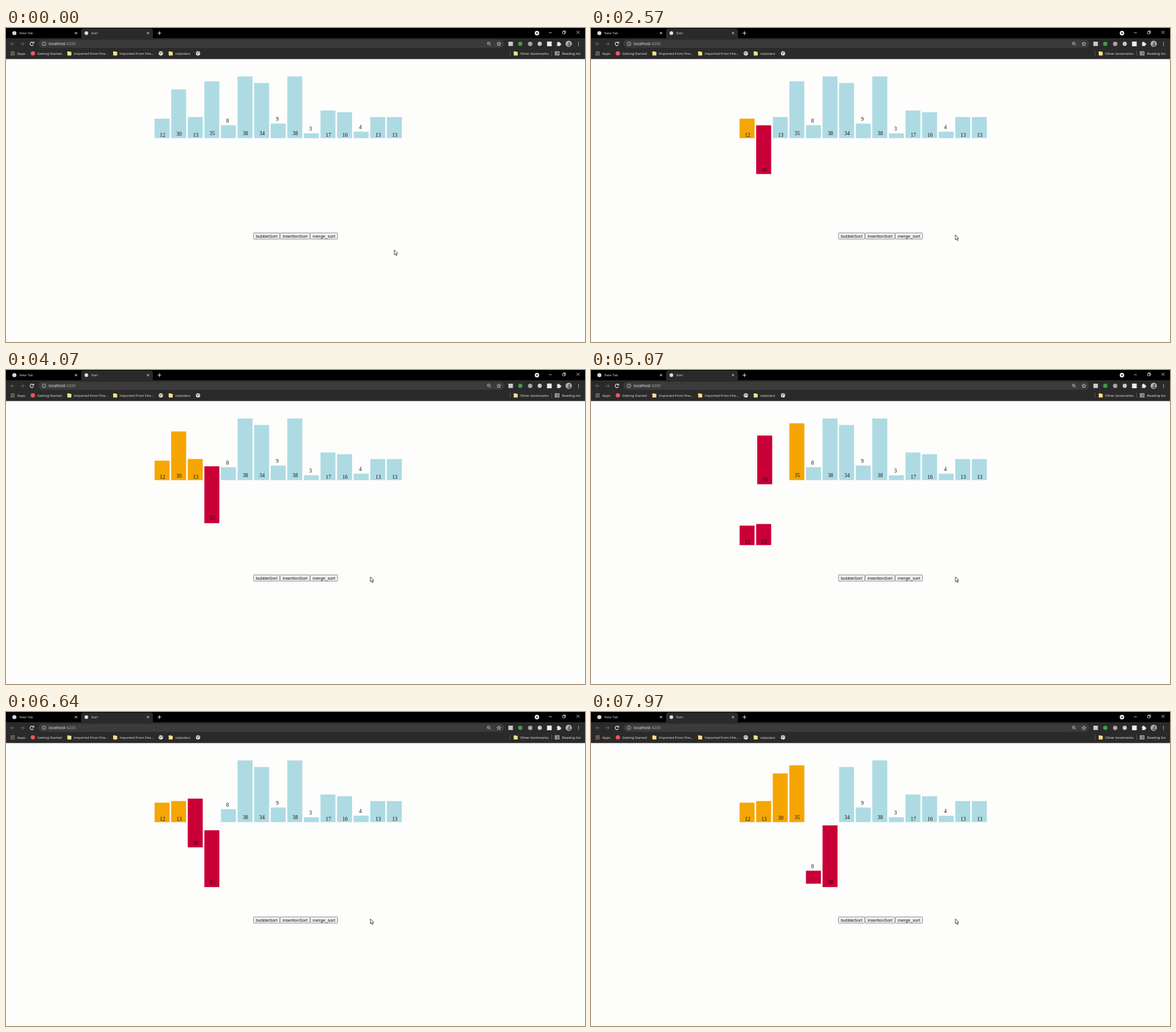
Write an HTML page with a canvas that moves like this. It is 1017 px wide and 551 px high and loops after 8 s.

```html
<!DOCTYPE html>
<html lang="en">
<head>
<meta charset="utf-8">
<title>Sort</title>
<style>
html, body { margin: 0; width: 100%; height: 100%; overflow: hidden; background: #fdfdfc; }
canvas { display: block; width: 1017px; height: 551px; }
</style>
</head>
<body>
<canvas id="stage"></canvas>
<script>
const W = 1017, H = 551, LOOP = 8000;
const canvas = document.getElementById('stage');
const ctx = canvas.getContext('2d');
const dpr = window.devicePixelRatio || 1;
canvas.width = W * dpr;
canvas.height = H * dpr;

const UI = '"Open Sans", "Noto Sans", sans-serif';
const ARIAL = '"Liberation Sans", Arial, sans-serif';
const SERIF = '"Liberation Serif", "Times New Roman", serif';
const BLUE = '#aedbe3', RED = '#c90037', ORANGE = '#f5a603';

const VALUES = [12, 30, 13, 35, 8, 38, 34, 9, 38, 3, 17, 16, 4, 13, 13];
const LEFT = 261, BASE = 193.3, PITCH = 29.14, BAR = 26.3, UNIT = 2.85, DROP = 114;

// Time in ms against the number of moves done.
const PACE = [[1400, 0], [1630, .61], [2570, 3.265], [4070, 7.216], [5070, 10.075], [6640, 14.352], [7970, 18.066], [8330, 19.05]];
const MOUSE_X = [[350, 682], [1000, 566], [1340, 566], [1630, 610.5], [1850, 640]];
const MOUSE_Y = [[350, 389.5], [1000, 364], [1340, 364], [1630, 359], [1850, 363]];

function along(keys, t) {
  if (t <= keys[0][0]) return keys[0][1];
  for (let i = 1; i < keys.length; i++) {
    const [t0, v0] = keys[i - 1], [t1, v1] = keys[i];
    if (t < t1) return v0 + (v1 - v0) * (t - t0) / (t1 - t0);
  }
  return keys[keys.length - 1][1];
}

// cubic-bezier(.25, .1, .25, 1)
function ease(u) {
  let lo = 0, hi = 1, s = .5;
  for (let i = 0; i < 24; i++) {
    s = (lo + hi) / 2;
    if (.75 * s * (1 - s) + s ** 3 < u) lo = s; else hi = s;
  }
  return .3 * s * (1 - s) ** 2 + 3 * s * s * (1 - s) + s ** 3;
}

// Each merge lowers its bars in sorted order, then lifts them one by one.
function mergeMoves() {
  const order = VALUES.map((_, i) => i), moves = [];
  (function sort(lo, hi) {
    if (lo >= hi) return;
    const mid = (lo + hi) >> 1;
    sort(lo, mid);
    sort(mid + 1, hi);
    const merged = order.slice(lo, hi + 1).sort((a, b) => VALUES[a] - VALUES[b]);
    for (const depth of [1, 0])
      merged.forEach((bar, k) => moves.push({ bar, slot: lo + k, depth }));
    merged.forEach((bar, k) => { order[lo + k] = bar; });
  })(0, VALUES.length - 1);
  return moves;
}
const MOVES = mergeMoves();

function barsAt(progress) {
  const bars = VALUES.map((value, slot) => ({ value, slot, depth: 0, color: BLUE }));
  for (let k = 0; k < progress; k++) {
    const { bar, slot, depth } = MOVES[k], b = bars[bar];
    const done = progress >= k + 1, e = done ? 1 : ease(progress - k);
    b.slot += (slot - b.slot) * e;
    b.depth += (depth - b.depth) * e;
    b.color = done && depth === 0 ? ORANGE : RED;
  }
  return bars;
}

function rect(x, y, w, h, fill, r = 0) {
  ctx.fillStyle = fill;
  ctx.beginPath();
  ctx.roundRect(x, y, w, h, r);
  ctx.fill();
}
function disc(x, y, r, fill) {
  ctx.fillStyle = fill;
  ctx.beginPath();
  ctx.arc(x, y, r, 0, 7);
  ctx.fill();
}
function ring(x, y, r, color, a0 = 0, a1 = 7) {
  ctx.strokeStyle = color;
  ctx.beginPath();
  ctx.arc(x, y, r, a0, a1);
  ctx.stroke();
}
function line(color, ...pts) {
  ctx.strokeStyle = color;
  ctx.beginPath();
  for (let i = 0; i < pts.length; i += 2) ctx.lineTo(pts[i], pts[i + 1]);
  ctx.stroke();
}
function text(str, x, y, size, font, color, align = 'left') {
  ctx.font = `${size}px ${font}`;
  ctx.fillStyle = color;
  ctx.textAlign = align;
  ctx.fillText(str, x, y);
}
function cross(x, y, r) {
  line('#eee', x - r, y - r, x + r, y + r);
  line('#eee', x + r, y - r, x - r, y + r);
}
function folder(x) {
  rect(x, 41, 4, 3, '#f3d573', .6);
  rect(x, 41.8, 7, 6.4, '#fbe08a', .6);
}
function globe(x) {
  disc(x, 44.5, 3.8, '#e8e8e8');
  ctx.lineWidth = 1;
  line('#444', x - 3, 43, x - .8, 44, x - 1, 46.5);
  line('#444', x + .5, 41.5, x + .8, 43.3, x + 3, 44.5);
}

function drawTabs() {
  rect(0, 0, W, 18.5, '#000');
  rect(132, 1, 126, 20, '#2a2a2a', 4);
  disc(14.7, 9, 3.6, '#d8d8d8');
  text('New Tab', 23.3, 11.3, 6.1, UI, '#ddd');
  disc(141.2, 9, 3.2, '#ddd');
  text('Sort', 149.8, 11.3, 6.1, UI, '#eee');
  ctx.lineWidth = .9;
  cross(123, 9, 2);
  cross(249.5, 9, 2);
  line('#fff', 266.3, 9, 272.7, 9);
  line('#fff', 269.5, 5.8, 269.5, 12.2);
  disc(932.6, 9, 3.9, '#f0f0f0');
  ctx.fillStyle = '#000';
  ctx.beginPath();
  ctx.moveTo(930.6, 8);
  ctx.lineTo(934.6, 8);
  ctx.lineTo(932.6, 10.6);
  ctx.fill();
  ctx.lineWidth = .8;
  line('#eee', 953.5, 8.2, 958.7, 8.2);
  ctx.strokeStyle = '#eee';
  ctx.strokeRect(977.8, 6.3, 3.8, 3.8);
  line('#eee', 979, 6, 979, 5, 982.9, 5, 982.9, 8.9, 981.8, 8.9);
  cross(1004.8, 7.5, 2.6);
}

function drawToolbar() {
  rect(0, 18, W, 36.5, '#2a2a2a');
  rect(57, 20.5, 818, 14.2, '#3b3b3b', 7.1);
  ctx.lineWidth = .9;
  line('#777', 15, 27.8, 8.4, 27.8);
  line('#777', 11.5, 24.7, 8.4, 27.8, 11.5, 30.9);
  line('#777', 25.2, 27.8, 32, 27.8);
  line('#777', 28.9, 24.7, 32, 27.8, 28.9, 30.9);
  ctx.lineWidth = 1.1;
  ring(45.5, 27.8, 3, '#eee', .5, 5.5);
  line('#eee', 48.8, 24, 48.8, 26.8, 46, 26.8);
  ctx.lineWidth = .8;
  ring(66.8, 27.7, 3.3, '#ccc');
  line('#ccc', 66.8, 27.3, 66.8, 29.6);
  line('#ccc', 66.8, 25.7, 66.8, 26.5);
  text('localhost', 75, 30.2, 7, UI, '#f2f2f2');
  const hostWidth = ctx.measureText('localhost').width;
  text(':4200', 75 + hostWidth, 30.2, 7, UI, '#a8a8a8');

  ring(847.8, 27, 2.4, '#ccc');
  line('#ccc', 849.6, 28.8, 852, 31.2);
  line('#ccc', 846.5, 27, 849.1, 27);
  ctx.strokeStyle = '#ddd';
  ctx.beginPath();
  for (let i = 0; i < 10; i++) {
    const a = -Math.PI / 2 + i * Math.PI / 5, r = i % 2 ? 1.6 : 3.7;
    ctx.lineTo(865.7 + r * Math.cos(a), 28 + r * Math.sin(a));
  }
  ctx.closePath();
  ctx.stroke();

  rect(882.4, 24, 8, 7.6, '#c9cbc9');
  disc(903.3, 27.8, 3.8, '#3f9c4d');
  disc(920.7, 27.8, 3.9, '#a5a5a5');
  disc(937.5, 27.8, 3.7, '#c8c8c8');
  rect(950.3, 23.8, 8.2, 8.2, '#e9eef5');
  rect(967.6, 25.6, 6, 6, '#eee', .6);
  disc(970.4, 25.2, 1.3, '#eee');
  disc(974, 28.5, 1.3, '#eee');
  disc(967.8, 28.8, 1, '#2a2a2a');
  disc(988.4, 27.7, 5.5, '#b5b1ae');
  disc(989.3, 26.4, 1.9, '#66605d');
  rect(986, 28.5, 6, 3.4, '#66605d', 1.6);
  for (const y of [25.2, 27.8, 30.4]) disc(1005.6, y, .75, '#eee');
}

function drawBookmarks() {
  const label = (str, x) => text(str, x, 46.7, 6.1, UI, '#f0f0f0');
  const dots = ['#e3635c', '#e8a24c', '#6fae62', '#d86a83', '#7f9ee0'];
  for (let i = 0; i < 9; i++)
    rect(8.2 + i % 3 * 2.6, 41.2 + Math.floor(i / 3) * 2.6, 1.7, 1.7, dots[i % 5]);
  label('Apps', 19.8);
  disc(47.2, 44.5, 3.8, '#ec5560');
  label('Getting Started', 55);
  folder(107.8);
  label('Imported From Fire...', 119.3);
  folder(188.3);
  label('Imported From Fire...', 199.7);
  globe(272);
  folder(285.8);
  label('vidyolara', 297.3);
  globe(337.3);
  rect(885.2, 40, .7, 9, '#666');
  folder(891.8);
  label('Other bookmarks', 903);
  rect(958.2, 40, .7, 9, '#666');
  ctx.lineWidth = .8;
  ctx.strokeStyle = '#ddd';
  ctx.strokeRect(964.6, 41.3, 7, 6.4);
  line('#ddd', 967, 41.3, 967, 47.7);
  for (const y of [43.2, 45.6]) line('#ddd', 964.6, y, 971.6, y);
  label('Reading list', 976.7);
}

function drawButton(str, x, w, hover) {
  rect(x, 359.2, w, 11.6, hover ? '#e4e4e4' : '#efefef', 1.3);
  ctx.lineWidth = .8;
  ctx.strokeStyle = hover ? '#4d4d4d' : '#777';
  ctx.beginPath();
  ctx.roundRect(x + .4, 359.6, w - .8, 10.8, 1.2);
  ctx.stroke();
  text(str, x + w / 2, 367.7, 7.77, ARIAL, '#111', 'center');
}

function drawBar({ value, slot, depth, color }) {
  const x = LEFT + slot * PITCH, base = BASE + depth * DROP, h = value * UNIT;
  rect(x, base - h, BAR, h, color);
  const y = value < 10 ? base - h - 4.5 : base - .1 - .15 * value;
  text(String(value), x + 9.2, y, 9.4, SERIF, '#111');
}

function drawCursor(x, y) {
  const pts = [0, 0, 0, 8.6, 2, 6.9, 3.4, 10, 4.8, 9.4, 3.5, 6.4, 6, 6.2];
  ctx.beginPath();
  for (let i = 0; i < pts.length; i += 2) ctx.lineTo(x + pts[i], y + pts[i + 1]);
  ctx.closePath();
  ctx.fillStyle = '#fff';
  ctx.fill();
  ctx.lineWidth = .8;
  ctx.strokeStyle = '#111';
  ctx.stroke();
}

function draw(t) {
  ctx.setTransform(dpr, 0, 0, dpr, 0, 0);
  rect(0, 0, W, H, '#fdfdfc');
  drawTabs();
  drawToolbar();
  drawBookmarks();
  barsAt(along(PACE, t)).forEach(drawBar);

  const mx = along(MOUSE_X, t), my = along(MOUSE_Y, t);
  drawButton('bubbleSort', 434.3, 47);
  drawButton('insertionSort', 481.2, 53);
  drawButton('merge_sort', 534, 48.8, t < 1670 && mx < 612);
  drawCursor(mx, my);
}

function frame(now) {
  draw(now % LOOP);
  requestAnimationFrame(frame);
}
draw(0);
requestAnimationFrame(frame);
</script>
</body>
</html>
```
